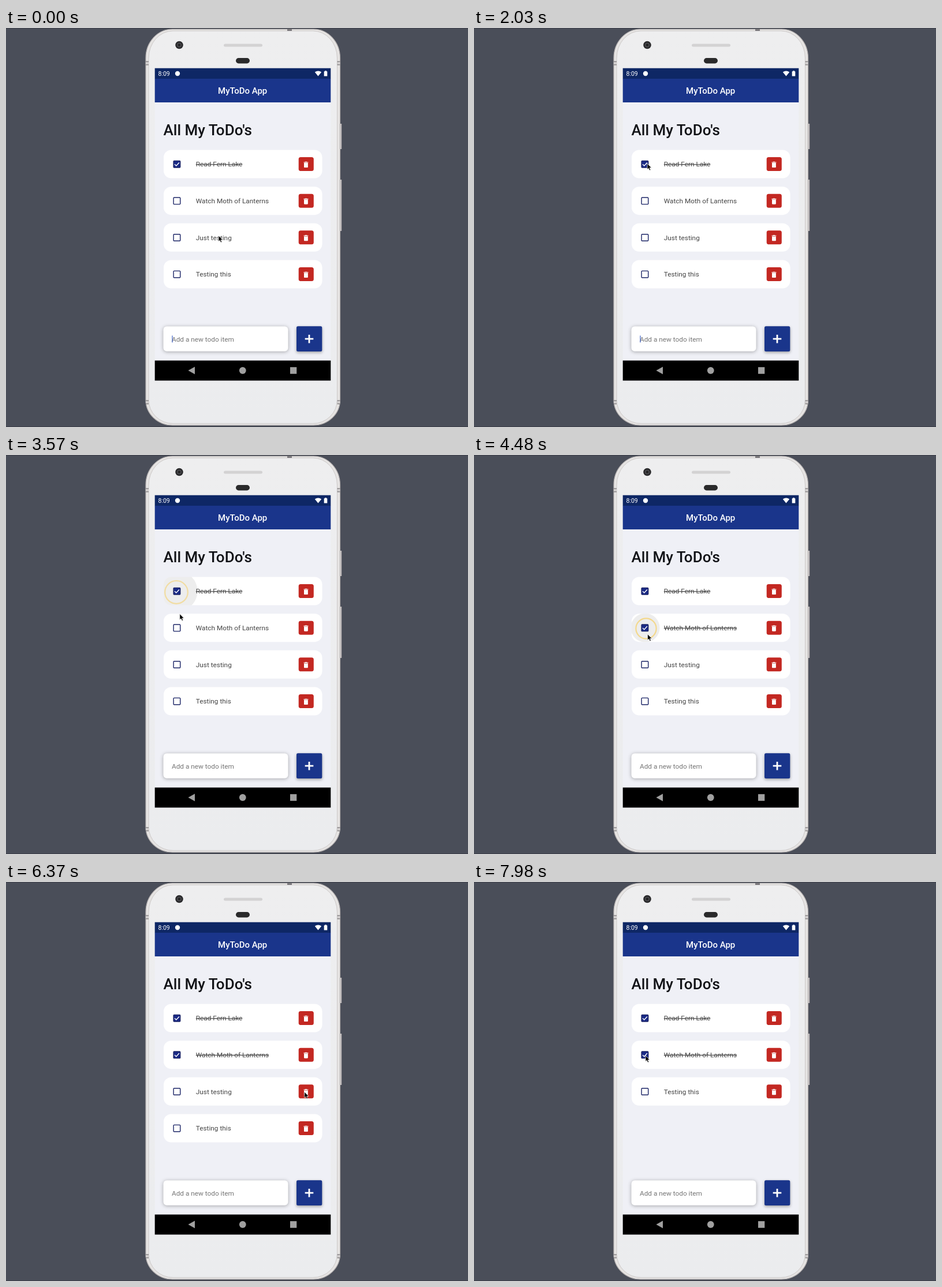
Animation of 800 by 692 pixels, one loop 8000 ms. Source, as an HTML page:

```html
<!DOCTYPE html>
<html lang="en">
<head>
<meta charset="utf-8">
<title>Todo app</title>
<style>
  html, body { margin: 0; width: 100%; height: 100%; overflow: hidden; background: #4a4e59; }
  svg { display: block; width: 100%; height: 100%; }
  text { font-family: Roboto, sans-serif; }
  .item { font-size: 11.8px; fill: #444; }
  .done { text-decoration: line-through; }
  .raised { filter: drop-shadow(0 1px 3px rgba(0, 0, 0, .32)); }
  .button { filter: drop-shadow(0 2px 2.5px rgba(0, 0, 0, .34)); }
</style>
</head>
<body>
<svg viewBox="0 0 800 692" preserveAspectRatio="none">
  <defs>
    <linearGradient id="shell" x2="0" y2="1">
      <stop offset="0" stop-color="#eeeeef"/>
      <stop offset="1" stop-color="#ebecee"/>
    </linearGradient>
    <clipPath id="cardClip"><rect x="273" y="211.5" width="274.5" height="49" rx="13"/></clipPath>
    <g id="trash">
      <rect x="506.7" y="224" width="26.1" height="24" rx="3.5" fill="#c32822"/>
      <path transform="translate(512.6 230.1) scale(.57)" fill="#fff"
        d="M6 19c0 1.1.9 2 2 2h8c1.1 0 2-.9 2-2V7H6zM19 4h-3.5l-1-1h-5l-1 1H5v2h14z"/>
    </g>
  </defs>

  <rect width="800" height="692" fill="#4a4e59"/>
  <path d="M0 .5H800M0 691.5H800" stroke="#3a3d48"/>

  <!-- phone body -->
  <path d="M579.5 166V210M579.5 263V352" stroke="#d6d3d3" stroke-width="3"/>
  <path d="M581 166V210M581 263V352" stroke="#8c898c" stroke-width=".8"/>
  <path d="M242 52A46 50 0 0 1 288 2H532.5A46 50 0 0 1 578.5 52V645A46 44 0 0 1 532.5 689H288A46 44 0 0 1 242 645Z"
    fill="#e6e4e3" stroke="#b3afaf" stroke-width="1.2"/>
  <path d="M247 52A42 47 0 0 1 289 5H531.5A42 47 0 0 1 573.5 52V645A42 41 0 0 1 531.5 686H289A42 41 0 0 1 247 645Z"
    fill="url(#shell)" stroke="#ccc8c7"/>
  <path d="M242 61H247M573.5 61H578.5M242 649H247M573.5 649H578.5" stroke="#8a8789" stroke-width="7"/>
  <path d="M242 61H247M573.5 61H578.5M242 649H247M573.5 649H578.5" stroke="#d2cfcf" stroke-width="4"/>
  <rect x="487" y="1.5" width="8" height="3.5" fill="#777579"/>
  <circle cx="300" cy="29.5" r="6.8" fill="#29292b"/>
  <circle cx="300" cy="29.5" r="4" fill="#4a4a4e"/>
  <circle cx="300" cy="29.5" r="2.3" fill="#222"/>
  <rect x="377" y="27.5" width="67" height="5" rx="2.5" fill="#d3d2d3"/>
  <rect x="398" y="52" width="24" height="9.5" rx="4.7" fill="#2a2a2b"/>

  <!-- screen -->
  <rect x="257.7" y="70" width="304.6" height="541.5" fill="#eff0f6"/>
  <rect x="257.7" y="69.7" width="304.6" height="18.5" fill="#0e2765"/>
  <rect x="257.7" y="88" width="304.6" height="41" fill="#1a358b"/>
  <text x="263.5" y="83" font-size="10.5" fill="#fff">8:09</text>
  <circle cx="297" cy="79" r="4.2" fill="#fff"/>
  <path d="M534.8 76.6Q540.5 72.2 546.2 76.6L540.5 83.4Z" fill="#fff"/>
  <path d="M550.7 75.2H552V74.2H555V75.2H556.3V83.6H550.7Z" fill="#fff"/>
  <text x="409.7" y="114.3" font-size="15" font-weight="500" fill="#fff" text-anchor="middle">MyToDo App</text>
  <text x="272.5" y="186.3" font-size="26" font-weight="500" fill="#111216">All My ToDo's</text>

  <g id="list"></g>

  <rect class="raised" x="272.5" y="517.5" width="216" height="43.3" rx="6" fill="#fff"/>
  <text x="287" y="543.5" font-size="11.8" fill="#757575">Add a new todo item</text>
  <path id="caret" d="M288 533.5V545.5" stroke="#3f62c4" stroke-width="1.2"/>
  <rect class="button" x="503" y="517.3" width="44.3" height="43.8" rx="2.5" fill="#1a358b"/>
  <path d="M517.7 539.2H532.3M525 531.9V546.5" stroke="#fff" stroke-width="2.8"/>

  <rect x="257.7" y="576.7" width="304.6" height="34.8"/>
  <g fill="#a0a0a0">
    <path d="M315.5 594L327 587.6V600.4Z"/>
    <circle cx="409.8" cy="594" r="5.9"/>
    <rect x="492" y="588.2" width="11.3" height="11.6"/>
  </g>

  <circle id="ring" fill="none" stroke="#f5d57c" stroke-width="2.2"/>
  <path id="cursor" d="M0 0V10.3L2.3 8.3L3.9 12L5.8 11.2L4.2 7.6H7.4Z" fill="#000" stroke="#fff" stroke-width=".7"/>
</svg>
<script>
const LOOP = 8000, PITCH = 63.65;
const UNCHECK = 2600, RECHECK = 3280, CHECK = 4300, REMOVE = 6600;
const $ = id => document.getElementById(id);
const clamp = v => Math.min(1, Math.max(0, v));
const smooth = u => u * u * (3 - 2 * u);

const labels = ["Read Fern Lake", "Watch Moth of Lanterns", "Just testing", "Testing this"];
const clicks = [
  { at: UNCHECK, x: 295, y: 238, row: 0 },
  { at: RECHECK, x: 295, y: 238, row: 0 },
  { at: CHECK, x: 298, y: 301, row: 1 },
  { at: REMOVE, x: 518, y: 364 }
];
// time, x, y of the pointer tip
const path = [
  [700, 368, 360], [1600, 300, 235], [2300, 300, 235], [2500, 296, 238],
  [3400, 296, 238], [3700, 304, 300], [4000, 304, 300], [4200, 299, 301],
  [4380, 299, 301], [4780, 309, 362], [5200, 299.5, 365], [5750, 299.5, 365],
  [6400, 518, 364], [6700, 518, 364], [7000, 502.5, 373], [7800, 297, 301]
];

$("list").innerHTML = labels.map(label => `
  <g>
    <rect x="273" y="211.5" width="274.5" height="49" rx="13" fill="#fff"/>
    <g clip-path="url(#cardClip)"><circle class="ripple" cx="296.5" cy="236"/></g>
    <rect class="box" x="290.1" y="230.4" width="11.6" height="11.6" rx="1" stroke="#1b2466" stroke-width="1.4"/>
    <path class="tick" d="M292 236.3L294.7 239L299.9 233.4" fill="none" stroke="#fff" stroke-width="1.4"/>
    <text class="item" x="328.8" y="240.4">${label}</text>
    <use href="#trash"/>
  </g>`).join("");

const rows = [...$("list").children].map(g => ({
  g,
  ripple: g.querySelector(".ripple"),
  box: g.querySelector(".box"),
  tick: g.querySelector(".tick"),
  text: g.querySelector("text")
}));

function pointer(t) {
  const i = path.findIndex(p => p[0] > t);
  if (i === 0) return path[0].slice(1);
  if (i < 0) return path[path.length - 1].slice(1);
  const [a, b] = [path[i - 1], path[i]];
  const u = smooth((t - a[0]) / (b[0] - a[0]));
  return [a[1] + (b[1] - a[1]) * u, a[2] + (b[2] - a[2]) * u];
}

function draw(t) {
  const removed = t >= REMOVE + 100;
  const click = clicks.filter(c => c.at <= t).pop();
  const age = click ? t - click.at : LOOP;
  const checked = [t < UNCHECK || t >= RECHECK, t >= CHECK, false, false];

  rows.forEach((row, i) => {
    const slot = removed && i > 2 ? i - 1 : i;
    row.g.setAttribute("transform", `translate(0 ${slot * PITCH})`);
    row.g.style.display = removed && i === 2 ? "none" : "";
    row.box.setAttribute("fill", checked[i] ? "#1a2a86" : "#fff0");
    row.tick.style.display = checked[i] ? "" : "none";
    row.text.classList.toggle("done", checked[i]);
    const live = click && click.row === i;
    row.ripple.setAttribute("r", live ? Math.min(38, 8.6 + age * .091) : 0);
    row.ripple.setAttribute("fill-opacity", .07 * clamp((500 - age) / 180));
  });

  const ring = $("ring");
  if (click) {
    ring.setAttribute("cx", click.x);
    ring.setAttribute("cy", click.y);
  }
  ring.setAttribute("r", 14 + 8 * clamp(age / 400));
  ring.setAttribute("opacity", .85 * clamp((430 - age) / 180));

  $("caret").style.display = t < UNCHECK && (t + 200) % 1000 < 500 ? "" : "none";
  $("cursor").setAttribute("transform", `translate(${pointer(t).join(" ")})`);
}

function frame() {
  draw(performance.now() % LOOP);
  requestAnimationFrame(frame);
}
frame();
</script>
</body>
</html>
```
